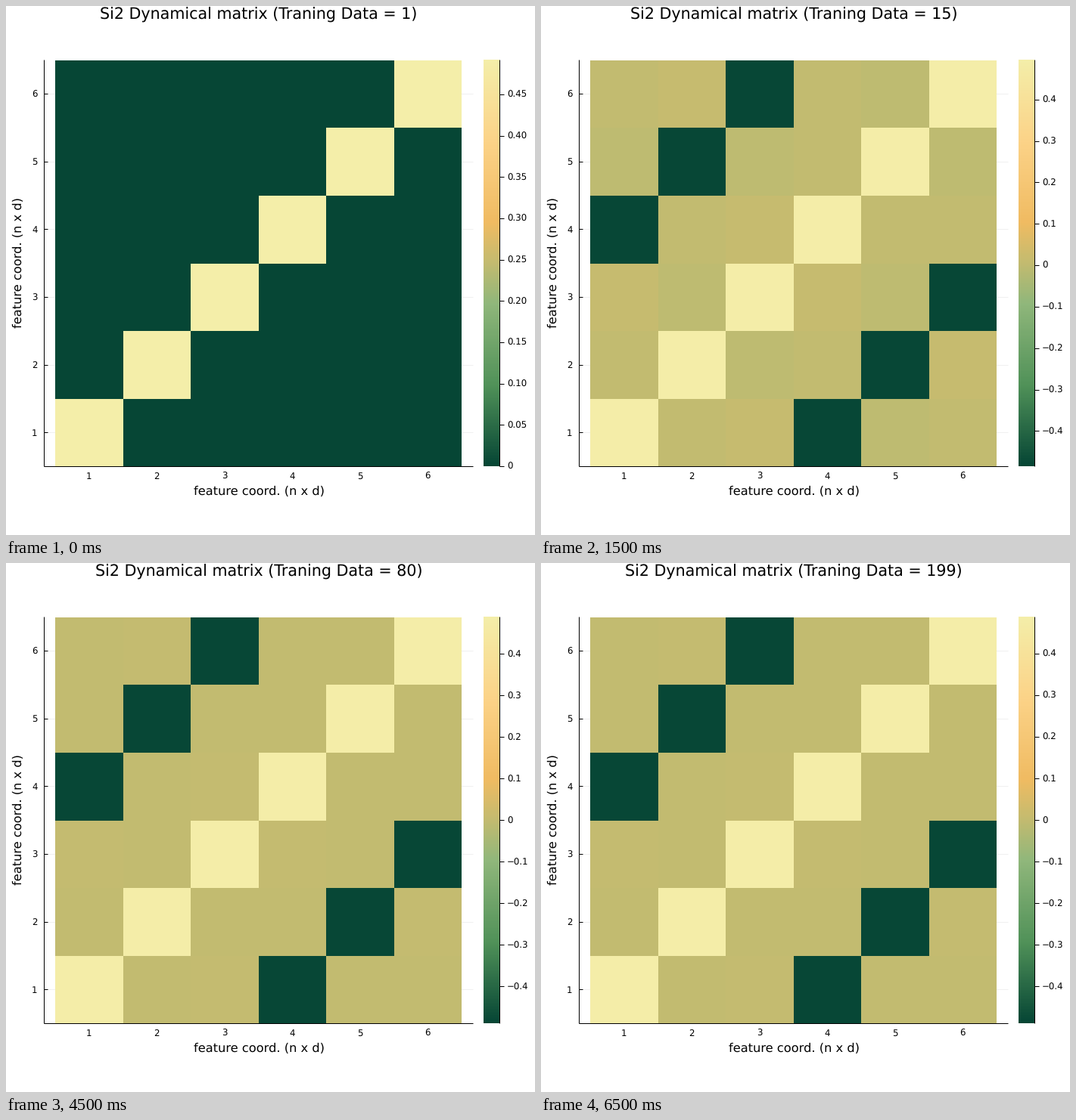
Write a matplotlib script that moves like this. It is 699 px wide and 700 px high and loops after 7000 ms.

```python
import numpy as np
import matplotlib.pyplot as plt
from matplotlib.animation import FuncAnimation
from matplotlib.colors import LinearSegmentedColormap

W, H, DPI = 699, 700, 100
PT = 72 / DPI
LEFT, RIGHT, TOP, BOTTOM = 65, 602, 71.4, 609
N = 6

plt.rcParams["font.family"] = "DejaVu Sans"
plt.rcParams["text.hinting"] = "none"

CMAP = LinearSegmentedColormap.from_list("field", [
    (0.0, "#064635"), (0.2, "#519259"), (0.4, "#90b77b"), (0.5, "#c3bb70"),
    (0.6, "#f0bb62"), (0.8, "#fcd388"), (1.0, "#f4eea9")])

# Sample sizes grow in ever larger steps
COUNTS = [1, *range(5, 20, 5), *range(20, 60, 10), *range(60, 121, 20), 150, 199]

# How strongly each coordinate is still mixed with the others at n = 5
MIX = np.array([.195, .255, .18, .155, .235, .20])

ROW, COL = np.indices((N, N))
DIAGONAL = ROW == COL
PAIRED = abs(ROW - COL) == N // 2


def shades(n):
    """Matrix entries as positions 0..1 along the colour map."""
    if n == 1:
        return DIAGONAL.astype(float)
    if n == 5:
        mix = MIX[:, None] + MIX
        diag = np.minimum(1, 1.363 - 1.1 * mix)
        paired = .4 * (mix.max(where=PAIRED, initial=0) - mix)
        return np.where(DIAGONAL, diag, np.where(PAIRED, paired, mix))
    # Remaining couplings settle as data is added
    noise = np.triu(np.random.default_rng(4).normal(-.005, .01, (N, N)), 1)
    rest = .5 + (noise + noise.T) * (10 / n) ** 2
    return np.where(DIAGONAL, .995, np.where(PAIRED, .005, rest))


def limits(n):
    if n == 1:
        return 0, .4916
    if n == 5:
        return -.465, .6316
    fade = 10 / n
    return -.4885 + .0075 * fade ** 2, .4878 + .0117 * fade


fig = plt.figure(figsize=(W / DPI, H / DPI), dpi=DPI, facecolor="white")
ax = fig.add_axes([0, 0, 1, 1])
ax.axis("off")


def line(x0, y0, x1, y1, color="black", z=3):
    return ax.plot([x0, x1], [y0, y1], color=color, lw=PT,
                   solid_capstyle="butt", zorder=z)[0]


def label(x, y, text, px, ha="center", **kw):
    return ax.text(x, y, text, fontsize=px * PT, ha=ha, va="baseline", **kw)


x_edges = np.ceil(np.linspace(LEFT, RIGHT, N + 1))
y_edges = np.ceil(np.linspace(BOTTOM, TOP, N + 1))
heat = ax.pcolormesh(x_edges, y_edges, np.eye(N), cmap=CMAP, vmin=0, vmax=1,
                     antialiased=False, zorder=2)
ax.imshow(np.linspace(1, 0, 256)[:, None], cmap=CMAP, vmin=0, vmax=1,
          extent=(631, 652, BOTTOM, 71), interpolation="nearest",
          aspect="auto", zorder=2)
ax.set_xlim(0, W)
ax.set_ylim(H, 0)

for k in range(N):
    x = LEFT + (k + .5) * (RIGHT - LEFT) / N
    y = BOTTOM - (k + .5) * (BOTTOM - TOP) / N
    line(50, y, 617, y, "#f0f0f0", 1)
    line(50, y, 55, y, z=1.5)
    label(x, 626, str(k + 1), 11.8)
    label(41.5, y + 4.4, str(k + 1), 11.8, "right")

line(50, 71, 50, BOTTOM)
line(50, BOTTOM, 617, BOTTOM)
line(652, 71, 652, BOTTOM)

title = label(334, 18, "", 20.7)
label(334.5, 647, "feature coord. (n x d)", 16.3)
label(20.5, 340, "feature coord. (n x d)", 16.3, rotation=90,
      rotation_mode="anchor")

ticks = [(line(652, 0, 658, 0), label(662, 0, "", 11.8, "left"))
         for _ in range(10)]


def tick_text(v, digits):
    if abs(v) < 1e-9:
        return "0"
    return f"{v:.{digits}f}".replace("-", "\u2212")


def update(i):
    n = COUNTS[i]
    lo, hi = limits(n)
    step, digits = {1: (.05, 2), 5: (.25, 2)}.get(n, (.1, 1))
    heat.set_array(shades(n))
    title.set_text(f"Si2 Dynamical matrix (Traning Data = {n})")

    first, last = int(np.ceil(lo / step)), int(np.floor(hi / step))
    values = [k * step for k in range(first, last + 1)]
    for k, (mark, text) in enumerate(ticks):
        shown = k < len(values)
        mark.set_visible(shown)
        text.set_visible(shown)
        if shown:
            y = BOTTOM - (values[k] - lo) / (hi - lo) * (BOTTOM - TOP)
            mark.set_ydata([y, y])
            text.set_y(y + 4.2)
            text.set_text(tick_text(values[k], digits))
    return [heat, title]


anim = FuncAnimation(fig, update, frames=len(COUNTS), interval=500,
                     repeat=True, repeat_delay=0, blit=False)
plt.show()
```
